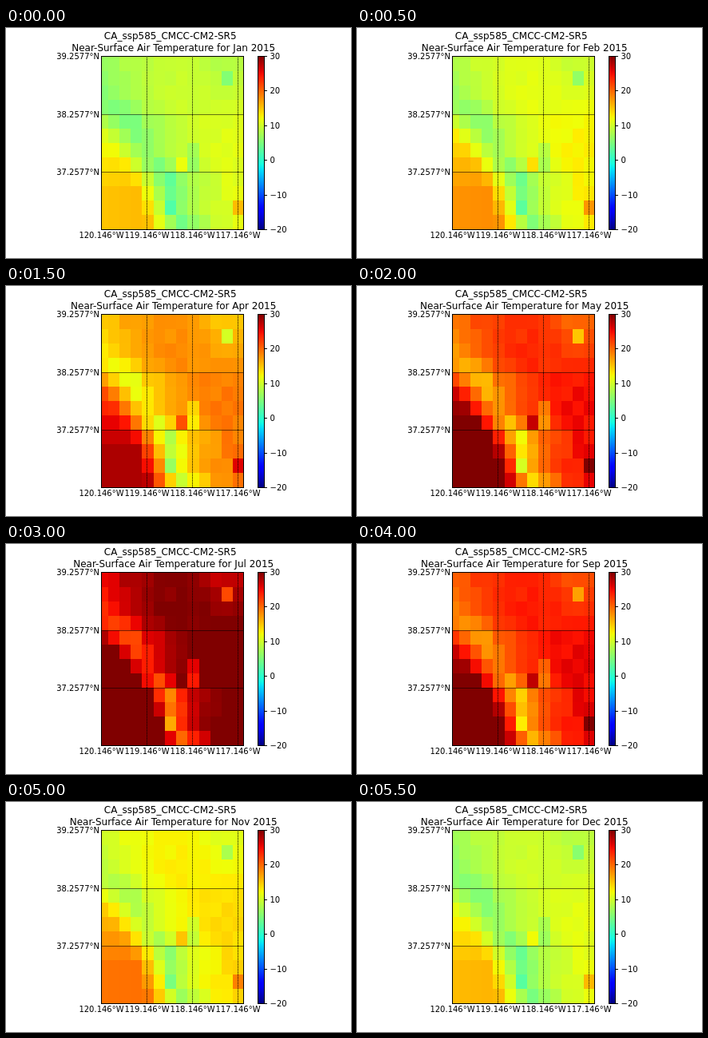
An HTML page for the animation above (6 s loop, 432 by 288 pixels).

```html
<!DOCTYPE html>
<html lang="en">
<head>
<meta charset="utf-8">
<title>Near-surface air temperature</title>
<style>
  html, body { margin: 0; width: 100%; height: 100%; overflow: hidden; background: #fff; }
  svg { display: block; width: 432px; height: 288px; }
  text { font: 10px "DejaVu Sans", sans-serif; fill: #000; }
  .title { font-size: 12px; text-anchor: middle; }
  .lat { text-anchor: end; }
  .lon { text-anchor: middle; }
  .line { fill: none; stroke: #000; stroke-width: 1; shape-rendering: crispEdges; }
  .dots { stroke-dasharray: 1 1; }
  .parallel { stroke-opacity: .55; }
</style>
</head>
<body>
<svg id="stage" viewBox="0 0 432 288"></svg>
<script>
const stage = document.getElementById("stage");
const STEP = 500;
const MONTHS = ["Jan", "Feb", "Mar", "Apr", "May", "Jun", "Jul", "Aug", "Sep", "Oct", "Nov", "Dec"];
const ROWS = 12, COLS = 13;
const LEFT = 119.5, RIGHT = 297.5, TOP = 35.5, BOTTOM = 252.5;

// Profiles from north to south as [row, value].
const RIDGE = [[0, .3], [2, .5], [4, 2.5], [6, 3.8], [8, 5.6], [11, 6.8]];
const CREST = [[0, 11], [2, 9], [4, 7], [6, 8.5], [8, 5.5], [11, 6]];
const VALLEY = [[0, 11.5], [3, 11], [5, 17], [7, 20.5], [9, 22.8]];

// Single peaks and basins: column, row, difference.
const SPOTS = [[11, 1, -4.5], [8, 6, -3.5], [7, 7, 5], [8, 7, -3.5], [6, 8, -2.5], [6, 10, -4.5], [12, 10, 7]];

function add(name, attrs, content = "", parent = stage) {
  const el = document.createElementNS("http://www.w3.org/2000/svg", name);
  for (const key in attrs) el.setAttribute(key, attrs[key]);
  el.textContent = content;
  parent.appendChild(el);
  return el;
}

function line(x1, y1, x2, y2, extra = "") {
  add("path", { class: "line " + extra, d: `M${x1} ${y1}L${x2} ${y2}` });
}

const clamp = v => Math.max(0, Math.min(1, v));
const mix = (a, b, t) => a + (b - a) * t;
const ramp = (v, from, to) => clamp((v - from) / (to - from));

function profile(points, row) {
  let value = points[0][1];
  for (let i = 1; i < points.length; i++) {
    const [from] = points[i - 1], [to, next] = points[i];
    value = mix(value, next, ramp(row, from, to));
  }
  return value;
}

let seed = 7;
function random() {
  seed = (seed * 16807) % 2147483647;
  return seed / 2147483647;
}

// The jet colour map over -20 to 30 degrees.
function jet(temp) {
  const t = clamp((temp + 20) / 50);
  const r = t < .8 ? ramp(t, .35, .66) : 1 - .5 * ramp(t, .89, 1);
  const g = Math.min(ramp(t, .125, .375), ramp(t, .91, .64));
  const b = t < .2 ? .5 + .5 * ramp(t, 0, .11) : ramp(t, .65, .34);
  return `rgb(${[r, g, b].map(v => Math.round(v * 255)).join(",")})`;
}

// Spring warmth: a cold ridge between a hot western valley and an eastern plain.
function terrain(row, col) {
  const away = col - profile(RIDGE, row);
  const crest = profile(CREST, row);
  if (away < 0) return mix(crest, profile(VALLEY, row), clamp(-away / 2.9));
  const northEast = ramp(col, 7, 10) * (1 - ramp(row, 0, 4));
  const plain = mix(14, 16, row / (ROWS - 1)) - 3 * northEast;
  const bump = (random() - .5) * mix(1, 2, row / (ROWS - 1));
  return mix(crest, plain, 1 - Math.exp(-away / 2.5)) + bump;
}

function temperature(month, spring, col) {
  const angle = month * Math.PI / 6;
  const mean = 16.5 - 9.6 * Math.cos(angle) + .8 * Math.cos(2 * angle - .87);
  const gain = 1.02 + .32 * Math.cos(angle - 2.83);
  const east = 1.8 * Math.abs(Math.cos(angle)) * col / (COLS - 1);
  return mean + gain * (spring - 12) + east;
}

const colEdge = i => Math.round(i === 0 ? LEFT : Math.min(RIGHT, 113.25 + 14.25 * i));
const rowEdge = i => Math.round(mix(TOP, BOTTOM, i / ROWS));

const cells = [];
for (let row = 0; row < ROWS; row++) {
  for (let col = 0; col < COLS; col++) {
    const x = colEdge(col), y = rowEdge(row);
    const rect = add("rect", { x, y, width: colEdge(col + 1) - x, height: rowEdge(row + 1) - y });
    const spot = SPOTS.find(([c, r]) => c === col && r === row);
    cells.push({ rect, col, spring: terrain(row, col) + (spot ? spot[2] : 0) });
  }
}

for (let i = 0; i < 3; i++) {
  const y = Math.floor(TOP + 72.5 * i) + .5;
  if (i) line(LEFT, y, RIGHT, y, "parallel");
  add("text", { class: "lat", x: 117, y: y + 3 }, `${39 - i}.2577°N`);
}
for (let i = 0; i < 4; i++) {
  const x = LEFT + 57 * i;
  if (i) line(x, 252, x, 36, "dots");
  add("text", { class: "lon", x, y: 263 }, `${120 - i}.146°W`);
}
add("rect", { class: "line", x: LEFT, y: TOP, width: RIGHT - LEFT, height: BOTTOM - TOP });

const scale = add("linearGradient", { id: "scale", x1: 0, y1: 1, x2: 0, y2: 0 });
for (let i = 0; i <= 50; i++) {
  add("stop", { offset: i / 50, "stop-color": jet(i - 20) }, "", scale);
}
const bar = { x: 315.5, y: TOP, width: 8, height: BOTTOM - TOP };
add("rect", { ...bar, fill: "url(#scale)" });
add("rect", { ...bar, class: "line" });
for (let i = 0; i < 6; i++) {
  const y = Math.floor(mix(BOTTOM, TOP, i / 5)) + .5;
  line(324, y, 327, y);
  add("text", { x: 330.5, y: y + 3.5 }, String(10 * i - 20).replace("-", "\u2212"));
}

add("text", { class: "title", x: 205.7, y: 14 }, "CA_ssp585_CMCC-CM2-SR5");
const heading = add("text", { class: "title", x: 209.7, y: 29 });

let shown = -1;
function draw(time) {
  const month = Math.floor(time / STEP) % MONTHS.length;
  if (month === shown) return;
  shown = month;
  heading.textContent = `Near-Surface Air Temperature for ${MONTHS[month]} 2015`;
  for (const { rect, col, spring } of cells) {
    rect.setAttribute("fill", jet(temperature(month, spring, col)));
  }
}

const start = performance.now();
function tick() {
  draw(performance.now() - start);
  requestAnimationFrame(tick);
}
tick();
</script>
</body>
</html>
```
